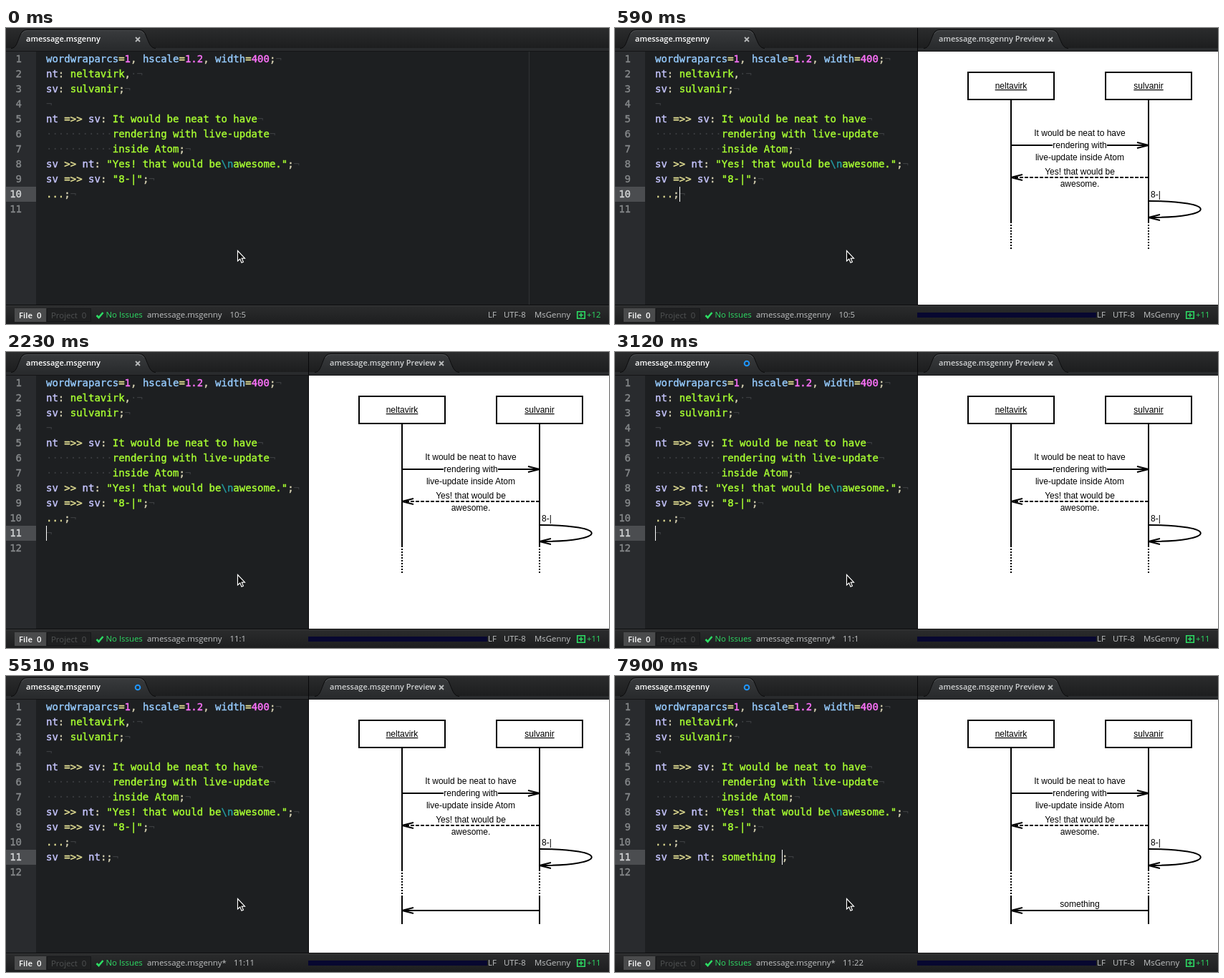
Animation of 842x414 px, one loop 8 s. Source, as an HTML page:

```html
<!DOCTYPE html>
<html lang="en">
<head>
<meta charset="utf-8">
<title>Live sequence chart preview</title>
<style>
  html, body { margin: 0; width: 100%; height: 100%; overflow: hidden; background: #1d1f21; }
  svg { display: block; width: 842px; height: 414px; }
  text { white-space: pre; }
  .mono { font: 14px "DejaVu Sans Mono", monospace; stroke-width: .4px; }
  .ui { font: 11.4px "Open Sans", sans-serif; fill: #c0c2c3; }
  .title { font: 600 11px "Open Sans", sans-serif; fill: #fff; }
  .chart { font: 12px "Liberation Sans", Arial, sans-serif; fill: #000; }
  .mid { text-anchor: middle; }
  .end { text-anchor: end; }
  .ink { fill: none; stroke: #000; stroke-width: 2; }
  .dots { stroke-dasharray: 2 2; }
  .dash { stroke-dasharray: 5 2; }
  .key { fill: #96cbfe; stroke: #96cbfe; }
  .num { fill: #ff73fd; stroke: #ff73fd; }
  .id { fill: #c6c5fe; stroke: #c6c5fe; }
  .op { fill: #e0dc92; stroke: #e0dc92; }
  .pun { fill: #d8d3b4; stroke: #d8d3b4; }
  .str { fill: #a8ff32; stroke: #a8ff32; }
  .esc { fill: #239aa2; stroke: #239aa2; }
  .ws { fill: #3b3d40; stroke: none; }
</style>
</head>
<body>
<svg viewBox="0 0 842 414">
  <defs>
    <linearGradient id="tabFill" x2="0" y2="1">
      <stop stop-color="#393b3d"/><stop offset="1" stop-color="#292b2d"/>
    </linearGradient>
    <linearGradient id="barFill" x2="0" y2="1">
      <stop stop-color="#2b2c2d"/><stop offset="1" stop-color="#1d1e1f"/>
    </linearGradient>
    <g id="tab">
      <path d="M0 28.5C7 28 8 22 12 12Q15 2.500 22 2.500H179Q186 2.500 189 12C193 22 195 28 202 28.500" fill="url(#tabFill)" stroke="#0b0b0c"/>
      <path d="M15 8Q18 3.500 23 3.500H178Q183 3.500 186 8" fill="none" stroke="#4c4e50"/>
    </g>
    <path id="cross" d="M-3 -3L3 3M3 -3L-3 3" stroke="#b9bbbc" stroke-width="1.8"/>
  </defs>

  <rect width="842" height="414" fill="#1d1f21"/>
  <rect width="842" height="28" fill="url(#barFill)"/>
  <rect y="28" width="842" height="4" fill="#292b2d"/>
  <rect y="32" width="842" height="1" fill="#141516"/>
  <rect y="33" width="42" height="355" fill="#292b2e"/>
  <rect x="730" y="33" width="1" height="355" fill="#303235"/>
  <use href="#tab" x="7"/>
  <text class="title" x="28" y="19">amessage.msgenny</text>
  <use id="close" href="#cross" x="184" y="16"/>
  <circle id="modified" cx="184" cy="16" r="3.300" fill="none" stroke="#1f96ff" stroke-width="2"/>

  <rect id="activeRow" width="42" height="21" fill="#4b4d50"/>
  <g id="numbers" class="mono end"></g>
  <g id="code" class="mono"></g>
  <rect id="caret" width="1" height="21" fill="#fff"/>

  <rect y="387" width="842" height="1" fill="#0c0c0d"/>
  <rect y="388" width="842" height="26" fill="url(#barFill)"/>
  <rect y="388" width="842" height="1" fill="#38393a"/>
  <rect x="12" y="392" width="44" height="19" fill="#4a4b4c"/>
  <rect x="57.500" y="392.500" width="61" height="18" fill="#1f2021" stroke="#17181a"/>
  <text class="ui" x="18" y="406" style="fill:#fff;font-weight:600">File  0</text>
  <text class="ui" x="63" y="406" style="fill:#505253">Project  0</text>
  <path d="M126.500 402L129.500 405L135.500 398" fill="none" stroke="#2ddc64" stroke-width="2.600"/>
  <text class="ui" x="139.500" y="405" style="fill:#2ddc64">No Issues</text>
  <text id="file" class="ui" x="197" y="405"></text>
  <text id="position" class="ui" y="405"></text>

  <g id="preview">
    <rect x="422" width="420" height="28" fill="url(#barFill)"/>
    <rect x="422" y="28" width="420" height="4" fill="#292b2d"/>
    <use href="#tab" x="431"/>
    <text class="title" x="452" y="19" style="fill:#cfd1d2">amessage.msgenny Preview</text>
    <use href="#cross" x="608" y="16"/>
    <rect x="423" y="33" width="419" height="354" fill="#fff"/>
    <rect x="422" width="1" height="388" fill="#08080a"/>
    <rect x="422" y="398" width="250" height="7" fill="#070730"/>
    <g id="chart"></g>
    <g id="reply">
      <path class="ink" d="M553 309V347M745 309V347"/>
      <path class="ink" d="M745 328H553M569 324L553 328L569 332"/>
      <text id="replyLabel" class="chart mid" x="649" y="323">something</text>
    </g>
  </g>

  <text class="ui" x="673" y="405">LF</text>
  <text class="ui" x="695" y="405">UTF-8</text>
  <text class="ui" x="738" y="405">MsGenny</text>
  <path d="M797.750 396.750H808.250V406.250H797.750ZM803 398.500V404.500M800 401.500H806" fill="none" stroke="#2ddc64" stroke-width="1.600"/>
  <text id="added" class="ui" x="811" y="405" style="fill:#2ddc64"></text>

  <path d="M323.500 311.500V326L326.800 323L329 328.200L331.400 327.200L329.200 322.200H333.500Z" fill="#000" stroke="#fff" stroke-width="1.200"/>
</svg>

<script>
const LOOP = 8000, TOP = 33, ROW = 21, LEFT = 56, CHAR = 8.428;
const NAMES = ['neltavirk', 'sulvanir'];
const $ = id => document.getElementById(id);

// Spans alternate class and text.
const message = (from, arrow, to) => ['id', from, 'op', ` ${arrow} `, 'id', to];
const indent = text => ['ws', '·'.repeat(11), 'str', text];
const lines = [
  ['key', 'wordwraparcs', 'op', '=', 'num', '1', 'pun', ', ', 'key', 'hscale', 'op', '=', 'num', '1.2',
    'pun', ', ', 'key', 'width', 'op', '=', 'num', '400', 'pun', ';'],
  ['id', 'nt', 'pun', ': ', 'str', NAMES[0], 'pun', ',', 'ws', '·'],
  ['id', 'sv', 'pun', ': ', 'str', NAMES[1], 'pun', ';'],
  [],
  [...message('nt', '=>>', 'sv'), 'pun', ': ', 'str', 'It would be neat to have'],
  indent('rendering with live-update'),
  [...indent('inside Atom'), 'pun', ';'],
  [...message('sv', '>>', 'nt'), 'pun', ': ', 'str', '"Yes! that would be', 'esc', '\\n', 'str', 'awesome."', 'pun', ';'],
  [...message('sv', '=>>', 'sv'), 'pun', ': ', 'str', '"8-|"', 'pun', ';'],
  ['op', '...', 'pun', ';']
];

function spans(parts) {
  let out = '';
  for (let i = 0; i < parts.length; i += 2)
    out += `<tspan class="${parts[i]}">${parts[i + 1].replace(/>/g, '&gt;')}</tspan>`;
  return out + '<tspan class="ws">¬</tspan>';
}

const baseline = row => TOP + ROW * (row - 1) + 15;
$('code').innerHTML = lines.map((parts, i) =>
  `<text x="${LEFT}" y="${baseline(i + 1)}">${spans(parts)}</text>`).join('') +
  `<text id="typed" x="${LEFT}" y="${baseline(11)}"></text>`;
$('numbers').innerHTML = Array.from({ length: 12 }, (_, i) =>
  `<text id="n${i + 1}" x="22" y="${baseline(i + 1)}">${i + 1}</text>`).join('');

const label = (x, y, text, extra = '') => `<text class="chart mid" x="${x}" y="${y}" ${extra}>${text}</text>`;
const ink = (d, style = '') => `<path class="ink ${style}" d="${d}"/>`;
const actor = (x, name) => ink(`M${x - 60} 62h120v38h-120zM${x} 100V271`) +
  ink(`M${x} 271V309`, 'dots') + label(x, 85, name, 'text-decoration="underline"');

$('chart').innerHTML = actor(553, NAMES[0]) + actor(745, NAMES[1]) +
  ink('M553 164H745M729 160L745 164L729 168') +
  '<rect x="611" y="157" width="76" height="14" fill="#fff"/>' +
  label(649, 151, 'It would be neat to have') +
  label(649, 168, 'rendering with') +
  label(649, 185, 'live-update inside Atom') +
  ink('M745 209H553', 'dash') + ink('M569 205L553 209L569 213') +
  label(649, 205, 'Yes! that would be') + label(649, 222, 'awesome.') +
  ink('M745 242C842 242 842 265 745 265M761 261L745 265L761 269') +
  '<text class="chart" x="748" y="237">8-|</text>';

// Each step changes part of the editor state and keeps the rest.
const type = text => ({ text: `: ${text}`, col: 12 + text.length, caret: true });
const on = { caret: true }, off = { caret: false };
const steps = [
  [0, { row: 10, col: 5, caret: false, text: null, preview: false, dirty: false, reply: false, label: false }],
  [450, on],
  [590, { preview: true }],
  [1030, off], [1330, on], [1780, off],
  [2230, { row: 11, col: 1, caret: true, text: null }],
  [2670, off],
  [2820, { dirty: true }],
  [3120, on],
  [3570, { text: '', col: 11 }],
  [3860, { reply: true }],
  [4010, off],
  [4460, { col: 10, caret: true }],
  [4910, { text: ':', col: 11 }],
  [5510, off],
  [5800, type('')],
  [6250, type('s')], [6400, type('so')], [6700, type('some')],
  [7000, type('somet')], [7150, type('someth')], [7300, type('somethin')],
  [7450, type('something')], [7600, type('something ')],
  [7900, { label: true }]
];

const show = (id, visible) => $(id).setAttribute('visibility', visible ? 'inherit' : 'hidden');

function typedLine(s) {
  if (s.row < 11) return '';
  if (s.text === null) return spans([]);
  return spans([...message('sv', '=>>', 'nt'), 'pun', s.text.slice(0, 2), 'str', s.text.slice(2), 'pun', ';']);
}

function draw(t) {
  const s = Object.assign({}, ...steps.filter(([at]) => at <= t).map(step => step[1]));
  const y = TOP + ROW * (s.row - 1);
  $('activeRow').setAttribute('y', y);
  $('caret').setAttribute('y', y);
  $('caret').setAttribute('x', Math.round(LEFT + CHAR * (s.col - 1)));
  for (let n = 1; n <= 12; n++) {
    const color = n === s.row ? '#d2d4d5' : '#86898b';
    $('n' + n).setAttribute('fill', color);
    $('n' + n).setAttribute('stroke', color);
  }
  $('typed').innerHTML = typedLine(s);
  $('file').textContent = 'amessage.msgenny' + (s.dirty ? '*' : '');
  $('position').textContent = `${s.row}:${s.col}`;
  $('position').setAttribute('x', s.dirty ? 318 : 312.5);
  $('added').textContent = s.preview ? '+11' : '+12';
  show('n12', s.row === 11);
  show('caret', s.caret);
  show('close', !s.dirty);
  show('modified', s.dirty);
  show('preview', s.preview);
  show('reply', s.reply);
  show('replyLabel', s.label);
}

const start = performance.now();
function tick() {
  draw((performance.now() - start) % LOOP);
  requestAnimationFrame(tick);
}
tick();
</script>
</body>
</html>
```
